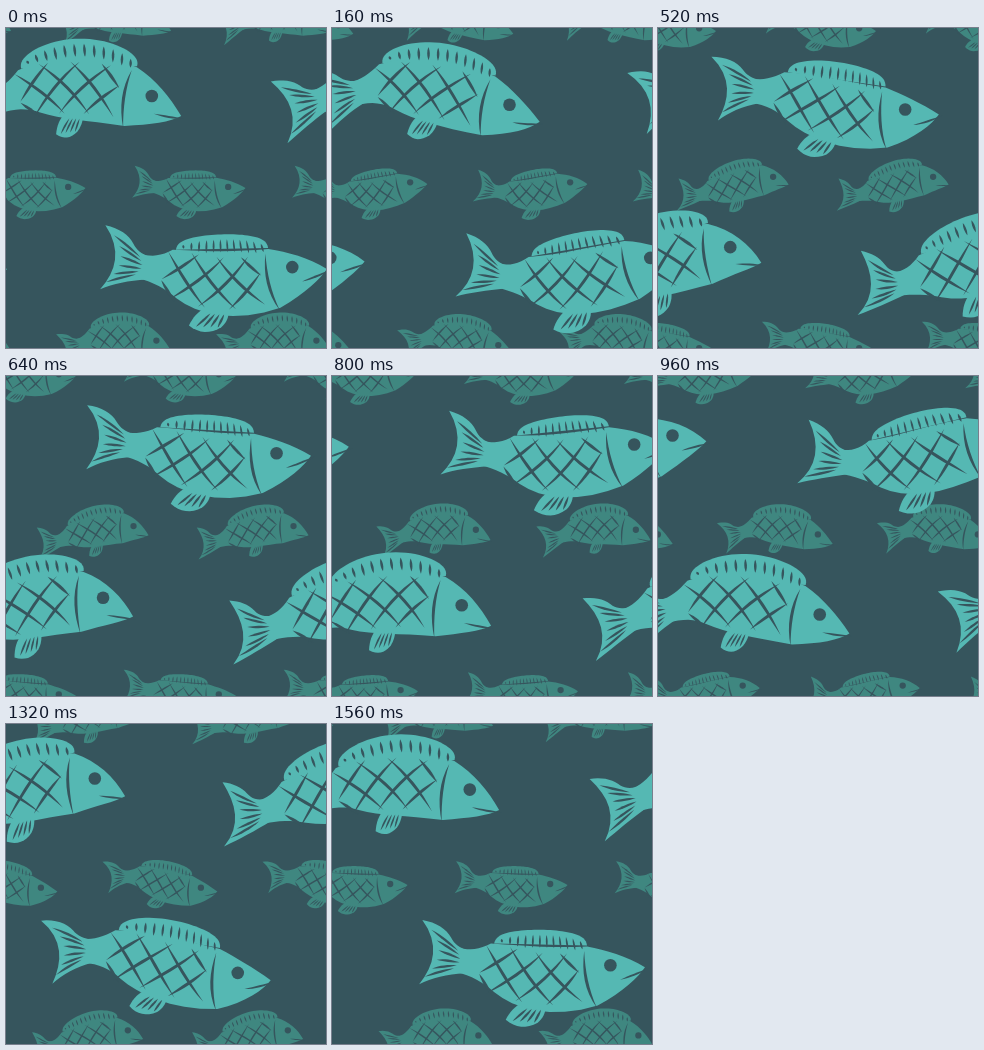
An HTML page with a canvas that plays this animation: 320 by 320 pixels, repeating every 1600 ms.

```html
<!DOCTYPE html>
<html>
<head>
<meta charset="utf-8">
<style>
html, body { margin: 0; width: 100%; height: 100%; overflow: hidden; background: #36555d; }
canvas { display: block; }
</style>
</head>
<body>
<canvas id="sea" width="320" height="320"></canvas>
<script>
const ctx = document.getElementById('sea').getContext('2d');
const WATER = '#36555d', LOOP = 1600, STEP = 40, SIZE = 320;

// Each school swims one period per loop along a fixed sine path.
const small = { scale: 0.5, crest: 32, color: '#3f8780', rows: [[53, -3], [-33.5, 160], [53, 317]] };
const big = { scale: 1, crest: 225, color: '#55b8b3', rows: [[-49, 75.5], [95, 241.5]] };

// Samples a chain of quadratic curves: start, then control and end of each.
function curve(...p) {
  const points = [];
  for (let i = 0; i + 5 < p.length; i += 4) {
    for (let t = 0; t <= 1; t += 0.125) {
      const mix = n => (1 - t) ** 2 * p[n] + 2 * t * (1 - t) * p[n + 2] + t * t * p[n + 4];
      points.push([mix(i), mix(i + 1)]);
    }
  }
  return points;
}

// Sliver pointed at both ends; bow pushes its middle sideways.
function sliver(x1, y1, x2, y2, width, bow = 0) {
  const len = Math.hypot(x2 - x1, y2 - y1);
  const nx = (y1 - y2) / len, ny = (x2 - x1) / len;
  const mx = (x1 + x2) / 2, my = (y1 + y2) / 2;
  const a = bow + width, b = bow - width;
  return curve(x1, y1, mx + nx * a, my + ny * a, x2, y2, mx + nx * b, my + ny * b, x1, y1);
}

// Upper edge of the back fin, s from 0 (rear) to 1 (head).
const finEdge = s => [69 + 104 * s, -26 - 6 * s - 21 * Math.max(0, Math.sin(Math.PI * s)) ** 0.4];

const backFin = Array.from({ length: 41 }, (_, i) => finEdge((1 - Math.cos(Math.PI * i / 40)) / 2));
const body = curve(38, -12, 52, -12, 66, -25, 120, -38, 173, -31, 203, -20, 225, 4,
  212, 16, 174, 29, 112, 37, 80, 21, 62, 11, 40, 12);
const tail = curve(0, -32, 26, 0, 4, 32, 24, 20, 48, 11, 54, 0, 46, -12, 34, -12, 28, -20, 19, -31, 0, -32);
const bellyFin = curve(107, 25, 98, 32, 95, 45, 109, 54, 122, 43, 128, 36, 128, 27);

const cuts = [
  sliver(169, -27, 173, 31, 3, 8),
  sliver(199, 9, 228, 6, 2, 1)
];
for (let f = -2.5; f < 3; f++) {
  cuts.push(sliver(19 - 1.6 * f * f, f * 9.5, 42 - Math.abs(f) * 2, f * 3.6, 2.4));
}
for (let i = 0; i < 12; i++) {
  const [u, v] = finEdge((i + 0.8) / 12.6);
  cuts.push(sliver(u + 1, Math.min(v + 18, -29), u - 0.5, v + 5, 2.2));
}
for (let i = 0; i < 4; i++) cuts.push(sliver(112 + i * 4, 30, 101 + i * 6, 45 - i * 0.5, 2));

// Scales: two families of slanted lines clipped to a box on the flank.
for (const [slant, first, count] of [[-0.95, 68, 4], [0.95, 55, 5]]) {
  for (let i = 0; i < count; i++) {
    const mid = first + 28 * i;
    const ends = [-27, 25].map(v => Math.min(161, Math.max(62, mid + slant * v)));
    cuts.push(sliver(ends[0], (ends[0] - mid) / slant, ends[1], (ends[1] - mid) / slant, 3));
  }
}

function drawFish({ scale, crest, color }, baseX, baseY) {
  const k = 2 * Math.PI / (SIZE * scale), amp = 15 * scale;

  // Places a point of the straight fish on the wavy path, leaning with its slope.
  function bend([u, v]) {
    const x = baseX + u * scale, phase = k * (x - crest);
    const lean = -0.85 * Math.atan(amp * k * Math.sin(phase));
    return [x - v * scale * Math.sin(lean), baseY + amp * Math.cos(phase) + v * scale * Math.cos(lean)];
  }

  function fill(points, style) {
    ctx.fillStyle = style;
    ctx.beginPath();
    for (const point of points) ctx.lineTo(...bend(point));
    ctx.fill();
  }

  for (const part of [tail, bellyFin, backFin, body]) fill(part, color);
  for (const part of cuts) fill(part, WATER);
  ctx.beginPath();
  ctx.arc(...bend([193, -7.5]), 6.3 * scale, 0, 2 * Math.PI);
  ctx.fill();
}

function draw(now) {
  const progress = Math.floor(now % LOOP / STEP) * STEP / LOOP;
  ctx.fillStyle = WATER;
  ctx.fillRect(0, 0, SIZE, SIZE);
  for (const school of [small, big]) {
    const period = SIZE * school.scale;
    for (const [x0, y] of school.rows) {
      const start = (x0 + progress * period + period) % period - period;
      for (let x = start; x < SIZE + 20; x += period) drawFish(school, x, y);
    }
  }
  requestAnimationFrame(draw);
}
requestAnimationFrame(draw);
</script>
</body>
</html>
```
